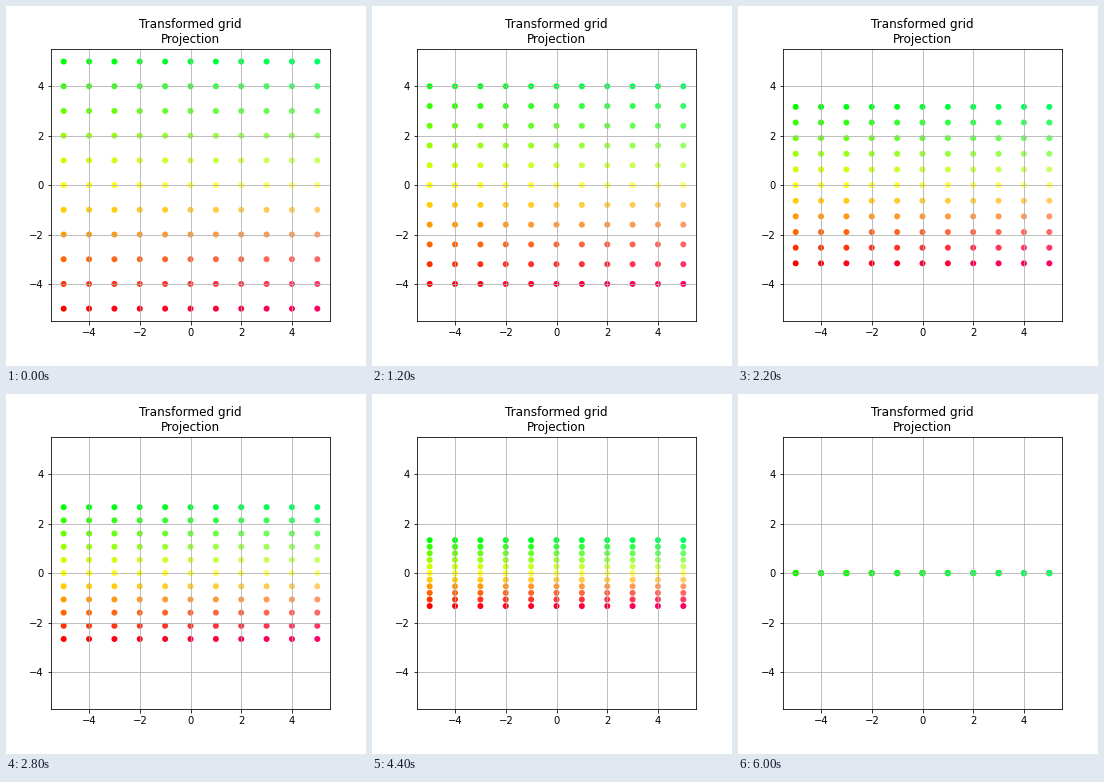
These frames come from a looping animation (360x360 px, 6.2 s). A matplotlib script:

```python
import numpy as np
import matplotlib.pyplot as plt
from matplotlib.animation import FuncAnimation

STEPS = 30
INTERVAL = 200
SPAN = 5


def grid_points(n):
    """Integer lattice, column by column from bottom to top."""
    axis = np.arange(-n, n + 1)
    x, y = np.meshgrid(axis, axis, indexing="ij")
    return np.column_stack([x.ravel(), y.ravel()]).astype(float)


def colorize(x, y):
    """Red at the bottom, green at the top, bluer to the right."""
    r = np.minimum(1, 1 - y / SPAN)
    g = np.minimum(1, 1 + y / SPAN)
    b = 0.2 + x / 25
    return np.clip(np.column_stack([r, g, b]), 0, 1)


identity = np.eye(2)
projection = np.array([[1.0, 0.0], [0.0, 0.0]])
points = grid_points(SPAN)

fig, ax = plt.subplots(figsize=(5, 5), dpi=72, facecolor="white")
fig.subplots_adjust(left=0.125, right=0.9, bottom=0.125, top=0.88)
ax.set_xlim(-SPAN - 0.5, SPAN + 0.5)
ax.set_ylim(-SPAN - 0.5, SPAN + 0.5)
ax.set_xticks(range(-4, 5, 2))
ax.set_yticks(range(-4, 5, 2))
ax.grid(True)
ax.set_title("Transformed grid\nProjection", fontsize=12)
dots = ax.scatter(*points.T, s=36, c=colorize(*points.T), edgecolor="none")


def update(frame):
    t = frame / STEPS
    matrix = (1 - t) * identity + t * projection
    dots.set_offsets(points @ matrix.T)
    return (dots,)


anim = FuncAnimation(fig, update, frames=STEPS + 1, interval=INTERVAL,
                     repeat=True, repeat_delay=0, blit=False)

plt.show()
```
